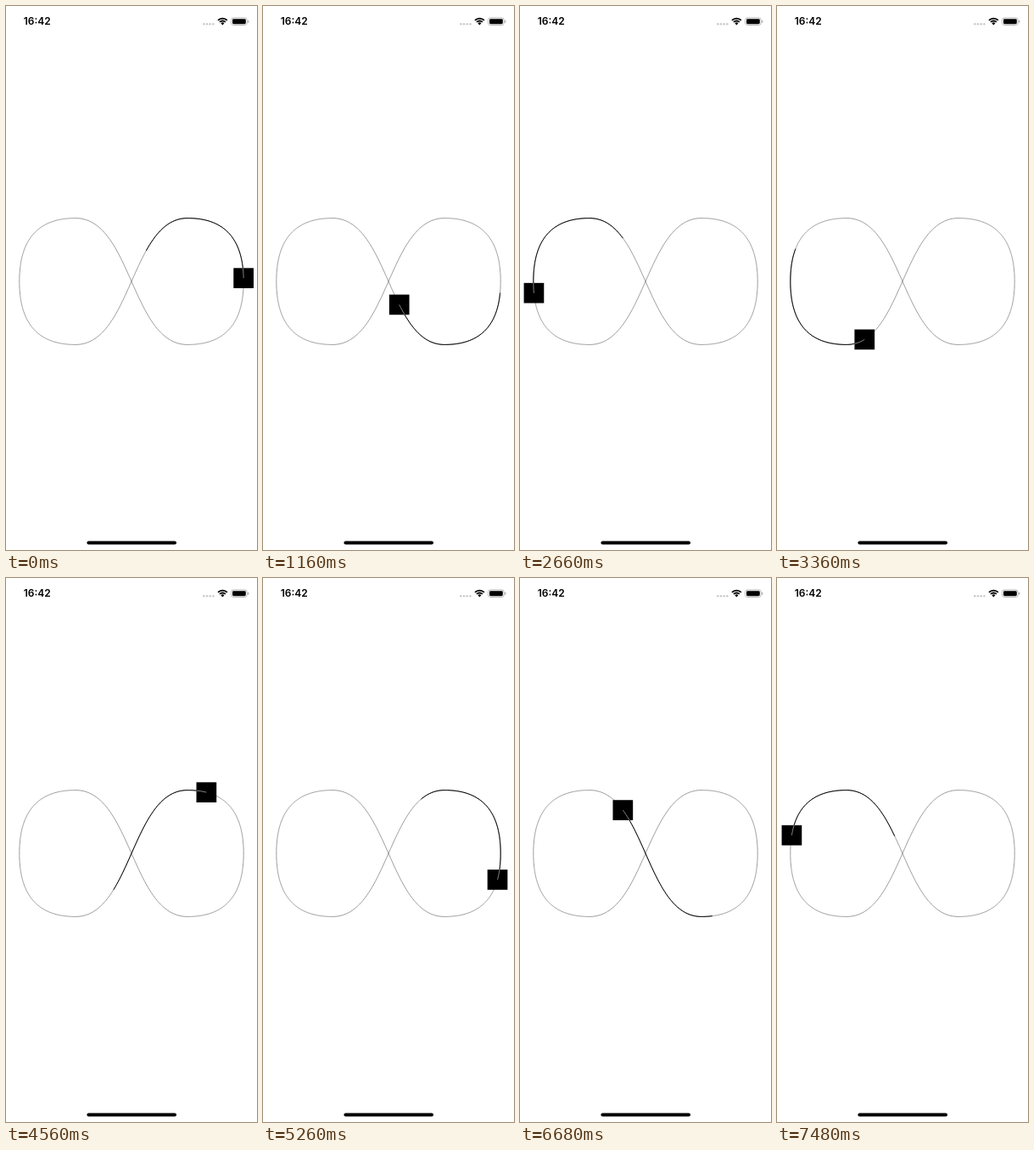
Write an HTML page with a canvas that moves like this. It is 296 px wide and 640 px high and loops after 7.58 s.

```html
<!DOCTYPE html>
<html lang="en">
<head>
<meta charset="utf-8">
<title>Infinity loop</title>
<style>
  html, body { margin: 0; width: 100%; height: 100%; overflow: hidden; background: #fff; }
  canvas { display: block; width: 296px; height: 640px; }
</style>
</head>
<body>
<canvas id="stage"></canvas>
<script>
const W = 296, H = 640, TAU = Math.PI * 2;
const canvas = document.getElementById('stage');
const ctx = canvas.getContext('2d');
const dpr = window.devicePixelRatio || 1;
canvas.width = W * dpr;
canvas.height = H * dpr;

// Timing: steps of 100 ms, a few of them slightly longer
const STEPS = 75, STEP = 100, LOOP = 7580, LAP = 5000;
const EXTRA = { 0: 10, 2: 10, 4: 10, 6: 10, 9: 20, 57: 20 };
const START = 0.2456, TRAIL = 0.2;
const ends = [];
for (let i = 0, t = 0; i < STEPS; i++) ends.push(t += STEP + (EXTRA[i] || 0));

// Figure eight: two diagonals (cubic) joined by rounded lobes (quadratic)
const CX = 148, CY = 324, A = 66.1, B = 74.4, SIDE = 23.7;
const quad = (a, b, c) => t => {
  const u = 1 - t;
  return [0, 1].map(k => u * u * a[k] + 2 * u * t * b[k] + t * t * c[k]);
};
const cubic = (a, b, c, d) => t => {
  const u = 1 - t;
  return [0, 1].map(k =>
    u * u * u * a[k] + 3 * u * u * t * b[k] + 3 * u * t * t * c[k] + t * t * t * d[k]);
};
const at = (x, y) => [CX + x * A, CY + y * B];
const lobe = s => [
  quad(at(s, -1), at(2 * s, -1), at(2 * s, 0)),
  quad(at(2 * s, 0), at(2 * s, 1), at(s, 1))
];
const diagonal = s => cubic(at(s, 1), at(0, 1), at(0, -1), at(-s, -1));
const curves = [diagonal(-1), ...lobe(1), diagonal(1), ...lobe(-1)];

const pts = [];
for (const f of curves) for (let i = 0; i < 120; i++) pts.push(f(i / 120));
pts.push(pts[0]);
const dist = [0];
for (let i = 1; i < pts.length; i++) {
  dist.push(dist[i - 1] + Math.hypot(pts[i][0] - pts[i - 1][0], pts[i][1] - pts[i - 1][1]));
}
const total = dist[dist.length - 1];
const centre = dist[60];

// Point at a fraction of the lap, counted from the crossing
function pointAt(p) {
  const d = (((p * total + centre) % total) + total) % total;
  let lo = 0, hi = dist.length - 1;
  while (hi - lo > 1) {
    const mid = (lo + hi) >> 1;
    if (dist[mid] <= d) lo = mid; else hi = mid;
  }
  const k = (d - dist[lo]) / (dist[hi] - dist[lo]);
  return [0, 1].map(j => pts[lo][j] + (pts[hi][j] - pts[lo][j]) * k);
}

function strokeLine(list, color, width) {
  ctx.beginPath();
  list.forEach(p => ctx.lineTo(p[0], p[1]));
  ctx.strokeStyle = color;
  ctx.lineWidth = width;
  ctx.stroke();
}

function pill(x, y, w, h, r, color) {
  ctx.beginPath();
  ctx.roundRect(x, y, w, h, r);
  ctx.fillStyle = color;
  ctx.fill();
}

function drawWifi(x, y) {
  const from = -Math.PI * 0.75, to = -Math.PI * 0.25;
  ctx.strokeStyle = ctx.fillStyle = '#000';
  ctx.lineWidth = 1.8;
  for (const r of [7.7, 4.9]) {
    ctx.beginPath();
    ctx.arc(x, y, r, from, to);
    ctx.stroke();
  }
  ctx.beginPath();
  ctx.moveTo(x, y);
  ctx.arc(x, y, 2.9, from, to);
  ctx.fill();
}

function drawChrome() {
  ctx.fillStyle = '#000';
  ctx.font = '600 12px Inter, "Liberation Sans", sans-serif';
  ctx.textBaseline = 'alphabetic';
  ctx.fillText('16:42', 20.7, 22.4);
  for (let i = 0; i < 4; i++) {
    ctx.beginPath();
    ctx.arc(233.3 + i * 3.7, 21.2, 1.2, 0, TAU);
    ctx.fillStyle = '#c8c8c8';
    ctx.fill();
  }
  drawWifi(255.4, 22.4);
  ctx.beginPath();
  ctx.roundRect(265.6, 13.9, 18.6, 8.6, 2.6);
  ctx.strokeStyle = '#a6a6a6';
  ctx.lineWidth = 0.8;
  ctx.stroke();
  pill(267, 15.2, 15.8, 6, 1.4, '#000');
  pill(285.2, 16.8, 1.1, 3, 0.6, '#a6a6a6');
  pill(95.4, 629.6, 105.6, 4, 2, '#000');
}

function draw(step) {
  ctx.setTransform(dpr, 0, 0, dpr, 0, 0);
  ctx.fillStyle = '#fff';
  ctx.fillRect(0, 0, W, H);
  drawChrome();

  const head = START + step * STEP / LAP;
  const [x, y] = pointAt(head);
  const trail = [];
  for (let i = 0; i <= 100; i++) trail.push(pointAt(head - TRAIL * (1 - i / 100)));

  strokeLine(pts, '#7f7f7f', 0.8);
  strokeLine(trail, '#000', 1);

  // The trail shows light where it crosses the square
  const box = [x - SIDE / 2, y - SIDE / 2, SIDE, SIDE];
  ctx.fillStyle = '#000';
  ctx.fillRect(...box);
  ctx.save();
  ctx.beginPath();
  ctx.rect(...box);
  ctx.clip();
  strokeLine(trail, '#a8a8a8', 0.8);
  ctx.restore();
}

const t0 = performance.now();
function tick() {
  const t = (performance.now() - t0) % LOOP;
  draw(Math.max(0, ends.findIndex(e => t < e)));
  requestAnimationFrame(tick);
}
tick();
</script>
</body>
</html>
```
